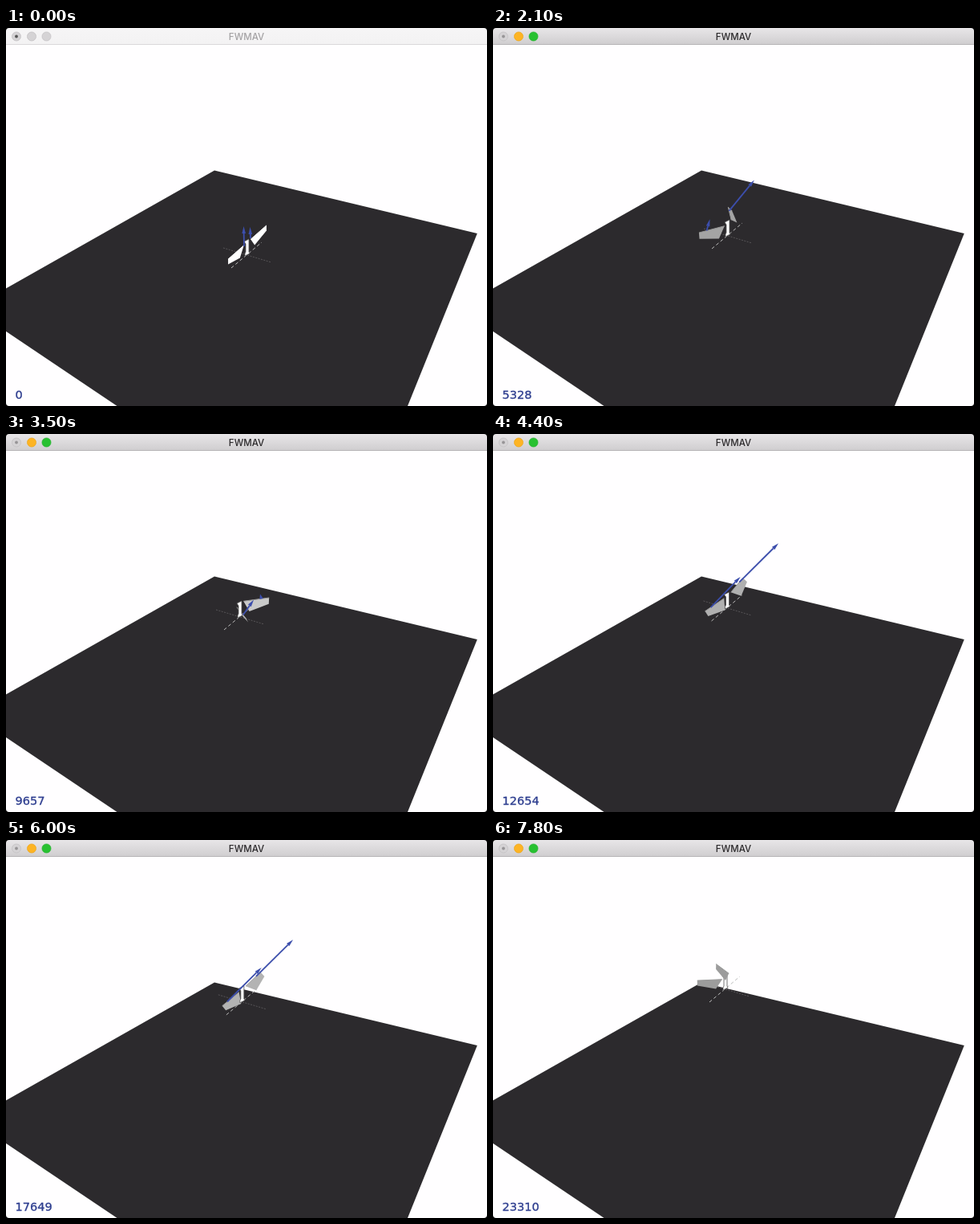
Animation, 600 px wide and 471 px high, one loop 8 s. Source, as an HTML page with a canvas:

```html
<!DOCTYPE html>
<html>
<head>
<meta charset="utf-8">
<style>
html, body { margin: 0; width: 100%; height: 100%; overflow: hidden; background: #000; }
canvas { display: block; border-radius: 4px; }
</style>
</head>
<body>
<canvas id="stage" width="600" height="471"></canvas>
<script>
const ctx = document.getElementById('stage').getContext('2d');
const LOOP = 8000, TAU = Math.PI * 2;
const STEPS = 333;          // simulation steps per drawn picture
const BEATS = 0.1322;       // wing-beat phase gained per picture
const STROKE = 1.18;        // stroke amplitude in radians
const SPAN = [21, -18.5], AHEAD = [27, 6];   // body axes on screen

// picture number, x, y of the body's foot
const PATH = [[0, 300, 283], [4, 300, 285], [16, 292, 259], [29, 291, 228],
              [47, 292, 206], [60, 296, 197], [70, 289, 186], [73, 288, 184]];

const mix = (a, u, b, v) => [a[0] * u + b[0] * v, a[1] * u + b[1] * v];
const add = (a, b, k = 1) => mix(a, 1, b, k);

function poly(points, fill, stroke) {
  ctx.beginPath();
  points.forEach(p => ctx.lineTo(p[0], p[1]));
  ctx.closePath();
  ctx.fillStyle = fill;
  ctx.fill();
  if (stroke) { ctx.strokeStyle = stroke; ctx.lineWidth = 0.8; ctx.stroke(); }
}

function line(a, b, color, width = 1, dash = []) {
  ctx.setLineDash(dash);
  ctx.strokeStyle = color;
  ctx.lineWidth = width;
  ctx.beginPath();
  ctx.moveTo(a[0], a[1]);
  ctx.lineTo(b[0], b[1]);
  ctx.stroke();
  ctx.setLineDash([]);
}

function disc(x, y, r, fill, stroke) {
  ctx.beginPath();
  ctx.arc(x, y, r, 0, TAU);
  ctx.fillStyle = fill;
  ctx.fill();
  if (stroke) { ctx.strokeStyle = stroke; ctx.lineWidth = 0.8; ctx.stroke(); }
}

function arrow(from, vec) {
  const len = Math.hypot(vec[0], vec[1]);
  if (len < 2) return;
  const u = [vec[0] / len, vec[1] / len], side = [-u[1], u[0]];
  const tip = add(from, vec), neck = add(tip, u, -Math.min(9, len));
  line(from, neck, '#3c4eac', 1.8);
  poly([tip, add(neck, side, 2.3), add(neck, side, -2.3)], '#3c4eac');
}

function footAt(n) {
  let i = 1;
  while (i < PATH.length - 1 && PATH[i][0] < n) i++;
  const [n0, ...a] = PATH[i - 1], [n1, ...b] = PATH[i];
  const k = (n - n0) / (n1 - n0);
  return mix(a, 1 - k, b, k);
}

// side: -1 left, 1 right
function wing(hinge, side, n) {
  const phase = TAU * BEATS * n;
  const angle = STROKE * Math.sin(phase), speed = Math.cos(phase);
  const reach = mix(SPAN, 0.94 * side * Math.cos(angle), AHEAD, -0.94 * Math.sin(angle));
  const sweep = mix(SPAN, -side * Math.sin(angle), AHEAD, -Math.cos(angle));
  const pitch = n ? 0.8 * speed : 0;
  const chord = mix([0, 1], Math.cos(pitch), sweep, -Math.sin(pitch) / 27);
  const root = add(hinge, SPAN, side * 0.2), tip = add(root, reach);
  const tone = n ? Math.round(180 - 24 * Math.sin(phase)) : 255;
  poly([root, tip, add(tip, chord, 6.5), add(add(root, reach, 0.25), chord, 11.5)],
       `rgb(${tone},${tone},${tone})`);
  line(root, tip, n ? '#999' : '#fff', 1);
  const power = speed * speed;
  const drag = -1.65 * power * Math.sign(speed);
  return n ? [add(root, reach, 0.7), add([0, -54 * power], sweep, drag)]
           : [add(hinge, [side * 4, -side * 5]), [-0.5, side < 0 ? -25 : -14]];
}

function flyer(n) {
  const foot = footAt(n), hinge = add(foot, [1, -16]);
  line(add(foot, [-29, -9]), add(foot, [31, 9]), '#626062', 0.8, [2, 1.5]);
  line(add(foot, [-19, 16]), add(foot, [19, -16]), '#bbb', 1, [4, 3]);
  const forces = [wing(hinge, -1, n)];
  const [x, y] = foot;
  poly([[x - 3, y - 17], [x + 3, y - 20], [x + 3, y - 4], [x + 4, y - 2],
        [x - 2, y + 1], [x - 2, y - 2], [x - 1, y - 4], [x - 1, y - 14]], '#fff', '#555');
  forces.push(wing(hinge, 1, n));
  forces.forEach(f => arrow(...f));
}

function titleBar(active) {
  const shade = ctx.createLinearGradient(0, 0, 0, 20);
  shade.addColorStop(0, active ? '#e8e6e8' : '#f6f5f6');
  shade.addColorStop(1, active ? '#d0ced0' : '#f3f2f3');
  ctx.fillStyle = shade;
  ctx.fillRect(0, 0, 600, 20);
  ctx.fillStyle = active ? '#b6b4b6' : '#dad8da';
  ctx.fillRect(0, 20, 600, 1);
  const off = ['#d5d3d5', '#c4c2c4'];
  disc(13, 10.5, 5.5, ...off);
  disc(13, 10.5, 1.9, active ? '#979597' : '#555');
  disc(32, 10.5, 5.5, ...(active ? ['#fdb424', '#eda720'] : off));
  disc(50.5, 10.5, 5.5, ...(active ? ['#28c131', '#23b42c'] : off));
  ctx.fillStyle = active ? '#2c2a2c' : '#a4a2a4';
  ctx.font = '500 11.5px Inter, Roboto, sans-serif';
  ctx.textAlign = 'center';
  ctx.fillText('FWMAV', 300, 15);
}

function counter(value) {
  ctx.textAlign = 'left';
  ctx.fillStyle = ctx.strokeStyle = '#2f3f90';
  ctx.lineWidth = 0.35;
  ctx.font = '14.5px "DejaVu Sans", sans-serif';
  ctx.fillText(value, 11.5, 462);
  ctx.strokeText(value, 11.5, 462);
}

function draw(now) {
  const t = now % LOOP;
  const tick = Math.max(0, Math.floor(t / 100) - 4);
  // the display lags by one picture every 21 ticks
  const n = Math.min(70, tick - Math.floor((tick + 11) / 21));

  ctx.fillStyle = '#fffeff';
  ctx.fillRect(0, 0, 600, 471);
  poly([[260, 177.5], [587.8, 256], [501, 471], [138.5, 471], [0, 378], [0, 324.5]], '#2c2a2d');
  flyer(n);
  titleBar(t >= 200);
  counter(n * STEPS);
  requestAnimationFrame(draw);
}
requestAnimationFrame(draw);
</script>
</body>
</html>
```
